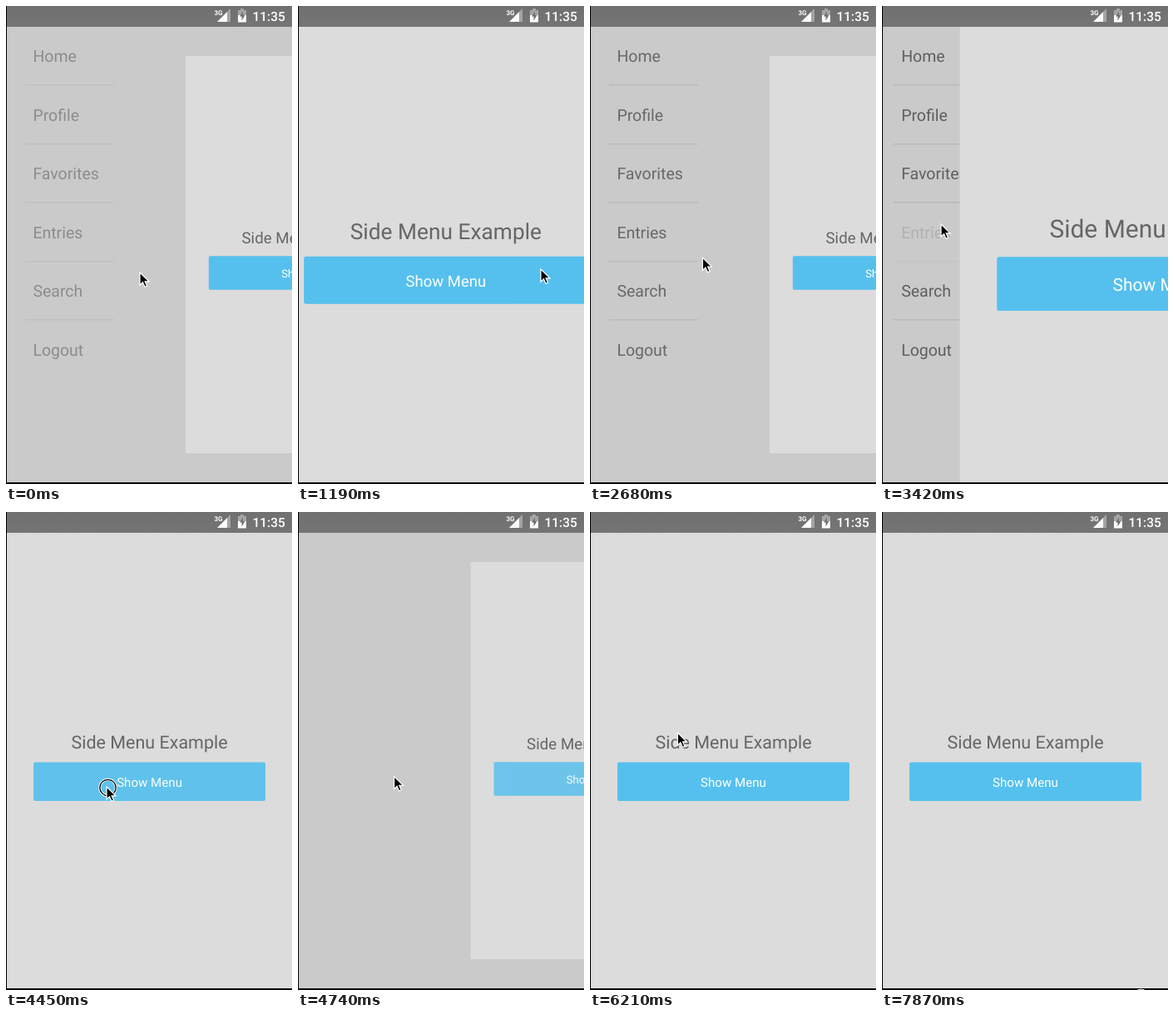
These frames come from a looping animation (344 by 574 pixels, 7.97 s). An HTML page:

```html
<!DOCTYPE html>
<html lang="en">
<head>
<meta charset="utf-8">
<title>Side Menu Example</title>
<style>
  html, body { margin: 0; width: 100%; height: 100%; overflow: hidden; background: #000; }
  svg { display: block; width: 344px; height: 574px; font-family: Roboto, sans-serif; text-rendering: geometricPrecision; }
  #menu { font-size: 19.5px; fill: #5f5f5f; }
  #menu rect { fill: #bababa; }
</style>
</head>
<body>
<svg viewBox="0 0 344 574">
  <defs>
    <clipPath id="screen"><rect x="1" y="25" width="343" height="547"/></clipPath>
    <linearGradient id="shade" x2="0" y2="1">
      <stop offset="0" stop-color="#707070"/><stop offset="1" stop-color="#757575"/>
    </linearGradient>
  </defs>
  <rect width="344" height="574"/>
  <g clip-path="url(#screen)">
    <rect x="1" y="25" width="343" height="547" fill="#cacaca"/>
    <g id="menu"></g>
    <g id="panel" text-anchor="middle">
      <rect x="-171.5" y="-273.5" width="343" height="547" fill="#dcdcdc"/>
      <text y="-15" font-size="21.5" fill="#666">Side Menu Example</text>
      <g id="button">
        <rect x="-139.5" y="1.9" width="279" height="46.6" rx="2" fill="#55c0ee"/>
        <text y="31.2" font-size="15.1" fill="#fff">Show Menu</text>
      </g>
    </g>
  </g>

  <rect x="1" width="343" height="25" fill="url(#shade)"/>
  <g fill="#fff">
    <text x="250.5" y="11" font-size="8" font-weight="700">3G</text>
    <path d="M266 7l4-4v16h-4z" fill="#a5a5a5"/>
    <path d="M254 19L266 7V19z"/>
    <path d="M279 5h3V3h4v2h3v6h-10z" fill="#a5a5a5"/>
    <path d="M279 11h10v8.5h-10z"/>
    <path d="M285 6.5l-4 6h2.5v5l4-6.5H285z" fill="#707070"/>
    <text x="296.5" y="18" font-size="15.5" font-weight="500">11:35</text>
  </g>

  <g id="pointer">
    <g id="ring" fill="none">
      <circle cx="1.5" cy="1" r="9.7" stroke="#fff" stroke-width="3"/>
      <circle cx="1.5" cy="1" r="9.7" stroke="#000" stroke-width="1.3"/>
    </g>
    <path d="M0 0V15L3.5 11.7L6 17.3L8.6 16.2L6.2 10.8H11z" stroke="#fff" stroke-width="1.2"/>
  </g>
</svg>
<script>
const LOOP = 7970, STEP = 147.8, OPEN_X = 193, OPEN_SCALE = .872, PEAK_SCALE = 1.392;
const $ = id => document.getElementById(id);

const ramp = (t, from, to) => Math.min(1, Math.max(0, (t - from) / (to - from)));
const easeOut = (p, power) => 1 - (1 - p) ** power;
const easeInOut = p => p < .5 ? 4 * p ** 3 : 1 - 4 * (1 - p) ** 3;
const mix = (a, b, p) => a + (b - a) * p;

// Each visit to the menu: when it opens, when it closes, which item is tapped.
const visits = [
  { open: -450, close: 752, item: 4 },
  { open: 2139, close: 3202, item: 3 },
  { open: 4418, close: 5402, item: 2 }
];
const taps = visits.flatMap(v => [v.open, v.close]);

const glides = [
  { from: 0, to: 600, x: 70, y: 338 },
  { from: 800, to: 1180, x: 292, y: 316 },
  { from: 1480, to: 2080, x: 170, y: 324 },
  { from: 2370, to: 3100, x: 71, y: 262 },
  { from: 3500, to: 4250, x: 121, y: 330 },
  { from: 4580, to: 5350, x: 66, y: 204 },
  { from: 5920, to: 7050, x: 310, y: 583 }
];

// The scale leads and the slide follows.
const opening = u => ({
  scale: mix(1, OPEN_SCALE, easeOut(ramp(u, 30, 220), 3)),
  x: OPEN_X * easeInOut(ramp(u, 0, 400)),
  menu: ramp(u, 330, 540)
});

// The panel swells past full size, then settles.
const closing = u => ({
  scale: mix(OPEN_SCALE, PEAK_SCALE, easeOut(ramp(u, 0, 180), 2))
    - (PEAK_SCALE - 1) * easeInOut(ramp(u, 295, 580)),
  x: OPEN_X * (1 - easeInOut(ramp(u, 20, 527))),
  menu: 1 - ramp(u, 200, 340)
});

const pressOpacity = u => 1 - .8 * Math.sin(Math.PI * ramp(u, 5, 335));

function cursorAt(t) {
  let x = 161, y = 320;
  for (const g of glides) {
    const p = ramp(t, g.from, g.to), eased = p * p * (3 - 2 * p);
    x = mix(x, g.x, eased);
    y = mix(y, g.y, eased);
  }
  return `${x} ${y}`;
}

$('menu').innerHTML = ['Home', 'Profile', 'Favorites', 'Entries', 'Search', 'Logout'].map((label, i) => {
  const y = 67 + i * 70.5;
  const line = i < 5 ? `<rect x="23" y="${Math.round(y + 27)}" width="107" height="1.5"/>` : '';
  return `<g><text x="32.4" y="${y}">${label}</text>${line}</g>`;
}).join('');
const items = [...$('menu').children];

function draw(time) {
  const t = Math.floor(time / STEP) * STEP;
  const visit = visits.findLast(v => t >= v.open);
  const isClosing = t >= visit.close;
  const u = t - (isClosing ? visit.close : visit.open);
  const { scale, x, menu } = isClosing ? closing(u) : opening(u);
  const press = pressOpacity(u);

  $('panel').setAttribute('transform', `translate(${172.5 + x} 298.5) scale(${scale})`);
  $('button').setAttribute('opacity', isClosing ? 1 : press);
  $('menu').setAttribute('transform', `translate(${(x - OPEN_X) * .28})`);
  $('menu').setAttribute('opacity', menu);
  items.forEach((el, i) => el.setAttribute('opacity', isClosing && i === visit.item ? press : 1));

  const tapped = taps.some(tap => t >= tap - 90 && t < tap + 58) || time >= LOOP - 100;
  $('pointer').setAttribute('transform', `translate(${cursorAt(t)})`);
  $('ring').setAttribute('visibility', tapped ? 'visible' : 'hidden');
}

const start = performance.now();
function tick() {
  draw((performance.now() - start) % LOOP);
  requestAnimationFrame(tick);
}
tick();
</script>
</body>
</html>
```
